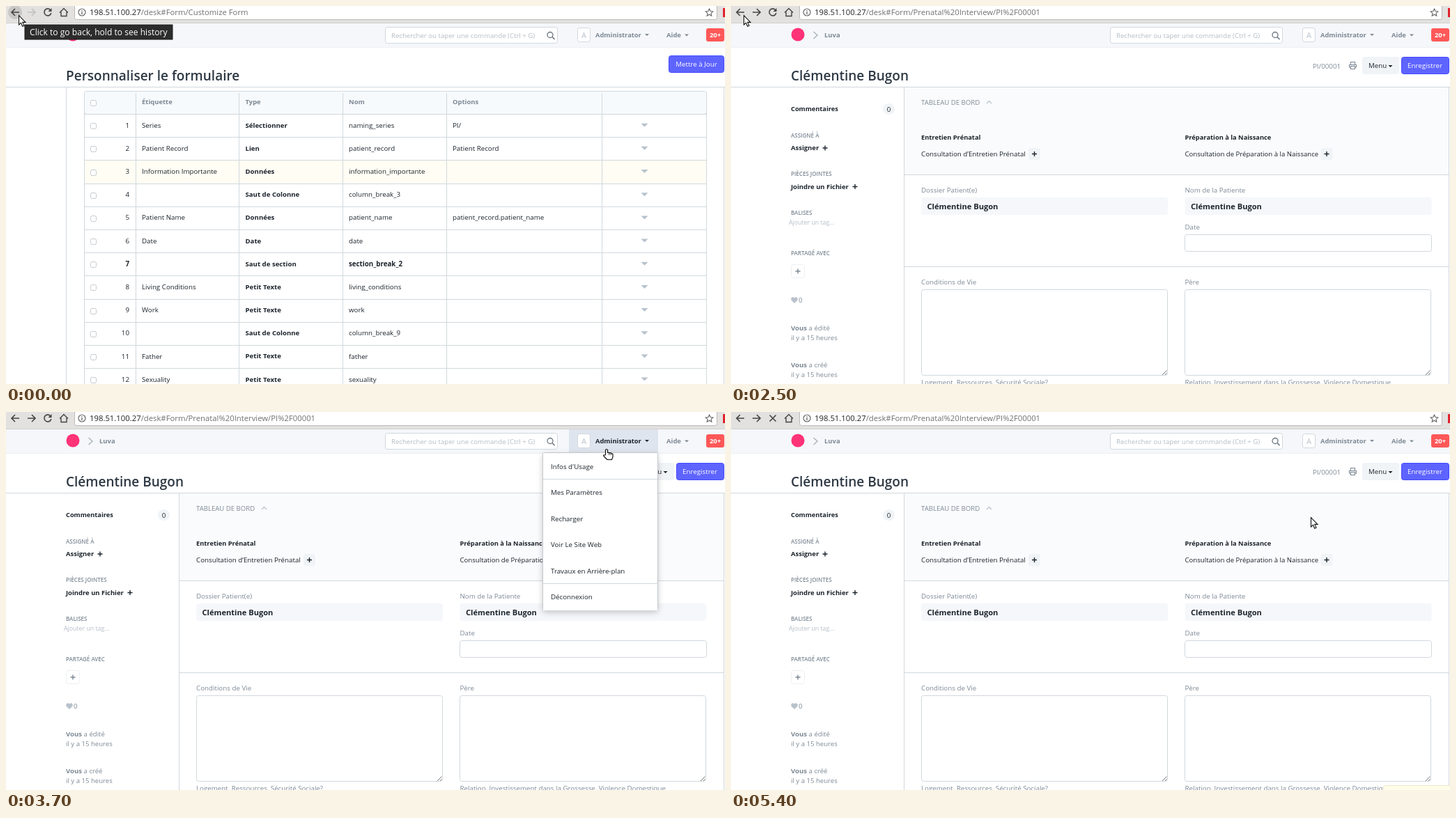
Recreate the animation shown at these times as an HTML page. Size 1032 by 543 pixels, loop 8 s.

```html
<!DOCTYPE html>
<html lang="fr">
<head>
<meta charset="utf-8">
<title>Formulaire</title>
<style>
  html, body { margin: 0; width: 100%; height: 100%; overflow: hidden; background: #fff; }
  svg { display: block; width: 100vw; height: 100vh; font-family: "Open Sans", "Noto Sans", sans-serif; }
  text { white-space: pre; }
</style>
</head>
<body>
<svg id="stage" viewBox="0 0 1032 543"></svg>
<script>
const INK = '#1c242c', MUTED = '#7d8995', LINE = '#d1d8dd', PALE = '#f5f7fa', BLUE = '#5e64ff';
const NAME = 'Clémentine Bugon';

// y is the middle of the capitals
const text = (x, y, s, { size = 9.75, fill = INK, w = 400, anchor = 'start' } = {}) =>
  `<text x="${x}" y="${y + size * .37}" font-size="${size}" fill="${fill}" font-weight="${w}" text-anchor="${anchor}">${s}</text>`;
const bold = (x, y, s, o) => text(x, y, s, { w: 700, size: 9.45, ...o });
const title = s => text(86, 100, s, { w: 600, size: 19, fill: '#2e3944' });
const muted = (x, y, s, o) => text(x, y, s, { fill: MUTED, ...o });
const rect = (x, y, w, h, fill, stroke = 'none', r = 0, more = '') =>
  `<rect x="${x}" y="${y}" width="${w}" height="${h}" rx="${r}" fill="${fill}" stroke="${stroke}" ${more}/>`;
const path = (d, stroke = LINE, w = 1, fill = 'none') =>
  `<path d="${d}" stroke="${stroke}" stroke-width="${w}" fill="${fill}"/>`;
const hline = (x, y, x2) => path(`M${x} ${y}H${x2}`);
const vline = (x, y, y2) => path(`M${x} ${y}V${y2}`);
const caret = (x, y, fill, r = 3) => path(`M${x - r} ${y - r / 2}h${2 * r}l${-r} ${r}z`, 'none', 0, fill);
const plus = (x, y, c = INK) => path(`M${x - 3.5} ${y}h7m-3.5 -3.5v7`, c, 1.4);
const group = (id, ...parts) => `<g id="${id}">${parts.join('')}</g>`;
const url = rest => `<text x="120" y="13.2" font-size="11.3" fill="#222">198.51.100.27<tspan fill="#707070">${rest}</tspan></text>`;

function tablePage() {
  const rows = [
    ['Series', 'Sélectionner', 'naming_series', 'PI/'],
    ['Patient Record', 'Lien', 'patient_record', 'Patient Record'],
    ['Information Importante', 'Données', 'information_importante', ''],
    ['', 'Saut de Colonne', 'column_break_3', ''],
    ['Patient Name', 'Données', 'patient_name', 'patient_record.patient_name'],
    ['Date', 'Date', 'date', ''],
    ['', 'Saut de section', 'section_break_2', ''],
    ['Living Conditions', 'Petit Texte', 'living_conditions', ''],
    ['Work', 'Petit Texte', 'work', ''],
    ['', 'Saut de Colonne', 'column_break_9', ''],
    ['Father', 'Petit Texte', 'father', ''],
    ['Sexuality', 'Petit Texte', 'sexuality', '']
  ];
  const cols = [195, 343.5, 492, 641];
  const box = y => rect(121.5, y - 3, 8, 8, '#fff', '#c5cacf', 2);
  let s = rect(112.5, 122.5, 893, 33, '#f7fafc', LINE, 3) + box(138.5);
  ['Étiquette', 'Type', 'Nom', 'Options'].forEach((h, i) => s += bold(cols[i], 138, h, { fill: MUTED }));
  rows.forEach((row, i) => {
    const y = 171.2 + i * 33.17, top = Math.round(155 + i * 33.2) + .5;
    const w = i == 6 ? 700 : 400;
    if (i == 2) s += rect(113, top, 892, 33, '#fffdf4');
    s += hline(112, top, 1005) + box(Math.round(y) + .5) + text(177, y, i + 1, { w, anchor: 'end' });
    row.forEach((cell, c) => s += c == 1 ? bold(cols[c], y, cell, { size: 9.65 }) : text(cols[c], y, cell, { w }));
    s += caret(916.5, y, '#b8c2cc', 5);
  });
  for (const x of [112.5, 186.5, 334.5, 483.5, 632.5, 855.5, 1005.5]) s += vline(x, 125, 543);
  return s + vline(86.5, 117, 543) + vline(1030.5, 117, 543)
    + title('Personnaliser le formulaire')
    + rect(951.5, 71.5, 79, 24, BLUE, '#444bff', 3)
    + text(991, 83.5, 'Mettre à Jour', { fill: '#fff', anchor: 'middle' })
    + bold(134, 42, 'Configuration', { fill: MUTED }) + url('/desk#Form/Customize Form');
}

function recordPage() {
  const small = (y, s) => bold(86, y, s, { size: 8, w: 600, fill: MUTED });
  const add = x => rect(x - 8.5, 204, 17, 17, '#f0f4f7', 'none', 3) + plus(x, 212.5);
  const area = x => rect(x + .5, 407.5, 353, 123, '#fff', LINE, 3)
    + path(`M${x + 346} 530l6.5 -6.5m-2.5 6.5l2.5 -2.5`, '#777');
  const field = x => rect(x, 275, 354, 25, PALE, 'none', 3) + bold(x + 8.5, 287.5, NAME, { size: 11.1 });
  return [
    title(NAME),
    bold(134, 42, 'Luva', { fill: MUTED }),
    url('/desk#Form/Prenatal%20Interview/PI%2F00001'),
    muted(835, 86, 'PI/00001'),
    path('M889.5 84v-3.5h6v3.5m-6 4h-2v-3.5h10v3.5h-2m-6 -1.5h6v4h-6z', MUTED, 1.1),
    rect(906, 73, 53, 25, '#f0f4f7', 'none', 3), text(915, 85.5, 'Menu'), caret(946.5, 86.5, INK),
    rect(962.5, 73.5, 68, 24, BLUE, '#444bff', 3),
    text(996, 85.5, 'Enregistrer', { fill: '#fff', anchor: 'middle' }),

    bold(86, 148, 'Commentaires', { size: 9.25 }),
    rect(218, 140, 17, 16, '#f0f4f7', 'none', 8), text(226.5, 148, '0', { anchor: 'middle' }),
    small(186, 'ASSIGNÉ À'), bold(86, 204, 'Assigner'), plus(135, 204),
    small(241.5, 'PIÈCES JOINTES'), bold(86, 259.5, 'Joindre un Fichier'), plus(178, 259.5),
    small(297, 'BALISES'), text(83, 311, 'Ajouter un tag...', { size: 8.8, fill: '#b5bec8' }),
    small(355.5, 'PARTAGÉ AVEC'),
    rect(86.5, 371.5, 19, 19, '#fff', '#e3e8ec', 3, 'stroke-dasharray="2 1"'), plus(96, 381, MUTED),
    path('M91 427l-4.3 -4.3c-2 -3 2 -6.5 4.3 -3.2c2.3 -3.3 6.3 .2 4.3 3.2z', 'none', 0, '#b8c2cc'),
    muted(97, 422.5, '0'),
    ...['édité', 'créé'].map((verb, i) =>
      muted(86, 462 + 53 * i, `<tspan font-weight="700">Vous</tspan> a ${verb}`, { size: 9.6 })
      + muted(86, 476 + 53 * i, 'il y a 15 heures', { size: 9.6 })),

    rect(249, 117, 781, 125, '#fafbfc'),
    vline(248.5, 117, 543), vline(1030.5, 117, 543), hline(249, 242.5, 1030), hline(249, 374.5, 1030),
    muted(273, 138, 'TABLEAU DE BORD', { size: 9.6 }), path('M367 140l3.5 -3.5l3.5 3.5', '#b8c2cc', 1.3),
    bold(273, 189, 'Entretien Prénatal', { size: 9.3 }),
    text(273, 212, 'Consultation d’Entretien Prénatal'), add(435.5),
    bold(651.5, 189, 'Préparation à la Naissance', { size: 9.3 }),
    text(651.5, 212, 'Consultation de Préparation à la Naissance', { size: 9.6 }), add(855),
    muted(273, 264.5, 'Dossier Patient(e)'), field(273),
    muted(651.5, 264.5, 'Nom de la Patiente'), field(651.5),
    muted(651.5, 317.5, 'Date'), rect(651.5, 328.5, 354, 24, '#fff', LINE, 3),
    muted(273, 396, 'Conditions de Vie'), area(273),
    muted(651.5, 396, 'Père'), area(651),
    muted(273, 540.5, 'Logement, Ressources, Sécurité Sociale?'),
    muted(651.5, 540.5, 'Relation, Investissement dans la Grossesse, Violence Domestique')
  ].join('');
}

const navBar = () => [
  rect(0, 25, 1032, 34, PALE), path('M0 59.5H1032', '#edf0f3'), hline(0, 116.5, 1032),
  rect(808, 25, 128, 34, '#dfe5ee', 'none', 0, 'id="navOpen"'),
  '<circle cx="96" cy="41" r="9.5" fill="#ff3377"/>',
  path('M118.5 37l5.5 5l-5.5 5', '#a9b3bd', 1.4),
  rect(544.5, 30.5, 247, 23, '#fff', LINE, 3),
  text(553, 42, 'Rechercher ou taper une commande (Ctrl + G)', { size: 9.65, fill: '#b4bcc4' }),
  '<circle cx="781" cy="41.5" r="4" fill="none" stroke="#68737e" stroke-width="1.3"/>',
  path('M784 44.5l3.5 3.5', '#68737e', 1.6),
  rect(820.5, 31.5, 18, 20, '#fff', LINE, 3),
  text(829.5, 42, 'A', { size: 11, fill: '#b8c2cc', anchor: 'middle' }),
  '<g id="user"><text x="846" y="45" font-size="9.35" font-weight="700">Administrator</text>'
    + '<path d="M917 40h6l-3 3z"/></g>',
  bold(948, 41.5, 'Aide', { fill: MUTED }), caret(977, 42, MUTED),
  rect(1005, 32, 26, 19, '#ff5858', 'none', 3),
  bold(1018, 41.5, '20+', { fill: '#fff', anchor: 'middle' })
].join('');

const chromeBar = () => [
  rect(0, 0, 1032, 24.5, '#e2e1e0'), path('M0 24.5H1032', '#d3d2d1'),
  rect(98.5, -4.5, 922, 24, '#fff', '#bcbab8', 3),
  '<circle id="backHover" cx="13" cy="9" r="10" fill="#c9c7c5"/>',
  path('M19 9H8m5 -5l-5 5l5 5', '#444', 1.6),
  '<path id="forward" d="M31 9h11m-5 -5l5 5l-5 5" fill="none" stroke-width="1.6"/>',
  group('reload', path('M64 6a5 5 0 1 0 .8 4', '#444', 1.6), path('M65.5 3v5h-5z', 'none', 0, '#444')),
  group('stop', path('M55.5 4.5l9 9m0 -9l-9 9', '#444', 1.6)),
  path('M77 9.5l6 -6l6 6m-10 -1v6h8v-6', '#444', 1.4),
  '<circle cx="109" cy="9" r="5" fill="none" stroke="#666" stroke-width="1.2"/>',
  path('M109 8v4m0 -6v1.2', '#666', 1.3),
  path('M1009.5 4l1.6 3.5l3.7 .4l-2.8 2.5l.8 3.7l-3.3 -1.9l-3.3 1.9l.8 -3.7l-2.8 -2.5l3.7 -.4z', '#666', 1.1),
  rect(1029, 3, 3, 13, '#e0232e')
].join('');

const rowTops = [59.5, 97, 134.5, 172, 209.5, 247, 285];
const menuBox = () => {
  const items = ['Infos d\'Usage', 'Mes Paramètres', 'Recharger', 'Voir Le Site Web', 'Travaux en Arrière-plan', 'Déconnexion'];
  return rect(770.5, 58.5, 165, 226, '#fff', '#c4c8cc', 2, 'style="filter:drop-shadow(0 3px 4px #0003)"')
    + items.map((s, i) => rect(771, rowTops[i], 164, rowTops[i + 1] - rowTops[i], '#fff', 'none', 0, 'class="row"')
      + text(782, (rowTops[i] + rowTops[i + 1]) / 2 - .3, s)).join('')
    + hline(771, 96.5, 935) + hline(771, 246.5, 935);
};

const stage = document.getElementById('stage');
stage.innerHTML = [
  navBar(), chromeBar(), group('table', tablePage()), group('record', recordPage()), group('menu', menuBox()),
  group('tip', rect(27, 27, 212, 21, '#2c2c2c', '#1c1c1c'),
    text(34, 37.5, 'Click to go back, hold to see history', { size: 12.1, fill: '#fff' })),
  group('notice', rect(936.5, 536.5, 100, 12, '#fffce7', '#eae6c8', 3)),
  group('arrow', path('M.5 .5v13.5l3 -2.8l2.2 5l2.3 -1l-2.2 -4.8h4.2z', '#111', 1.1, '#fff')),
  group('hand', path('M-1.5 8.5V1.5q1.5 -2 3 0v4q4 -.5 7.5 2v4l-1.5 4h-6.5l-4.5 -4.5q-2.5 -3 1 -2z', '#111', 1.2, '#fff'),
    path('M3.7 6v3m2.4 -2.5v2.5', '#111', .8))
].join('');

const el = id => document.getElementById(id);
const show = (id, on) => el(id).style.display = on ? '' : 'none';
const rowEls = [...document.querySelectorAll('.row')];

// pointer legs: start, end, from, to, easing power
const legs = [
  [2500, 2700, [18, 13], [648, 21], 1],
  [2800, 3300, [648, 21], [862, 53], 1],
  [3800, 4500, [862, 53], [833, 151], 1.6]
];
function pointer(t) {
  const [a, b, p, q, pow] = legs.findLast(l => t >= l[0]) || legs[0];
  const k = 1 - (1 - Math.min(1, Math.max(0, (t - a) / (b - a)))) ** pow;
  return p.map((v, i) => v + (q[i] - v) * k);
}
const rowAt = y => rowTops.findIndex((top, i) => y >= top && y < rowTops[i + 1]);

function draw(now) {
  const t = Math.floor(now % 8000 / 100) * 100;
  const [x, y] = pointer(t);
  const first = t < 1400, open = t >= 3500 && t < 5000;
  const hand = t < 5000 && x > 808;

  show('table', first);
  show('record', !first);
  show('tip', t < 1300);
  show('backHover', t < 1300 || t >= 1400 && t < 1600);
  el('forward').setAttribute('stroke', first ? '#c2c0be' : '#444');
  show('menu', open);
  show('navOpen', open);
  el('user').setAttribute('fill', hand ? INK : MUTED);
  show('reload', t < 5300);
  show('stop', t >= 5300);
  show('notice', t >= 5400);

  // the row highlight trails the pointer by one step
  const lit = rowAt(pointer(t - 100)[1]), next = rowAt(y);
  rowEls.forEach((r, i) => r.setAttribute('fill', i == lit ? '#f5f6f8' : i == next ? '#fbfbfc' : '#fff'));

  show('hand', hand);
  show('arrow', !hand);
  const at = t < 5000 ? [x, y] : [832, 151];
  el(hand ? 'hand' : 'arrow').setAttribute('transform', `translate(${at})`);
}

const start = performance.now();
function tick() {
  draw(performance.now() - start);
  requestAnimationFrame(tick);
}
tick();
</script>
</body>
</html>
```
